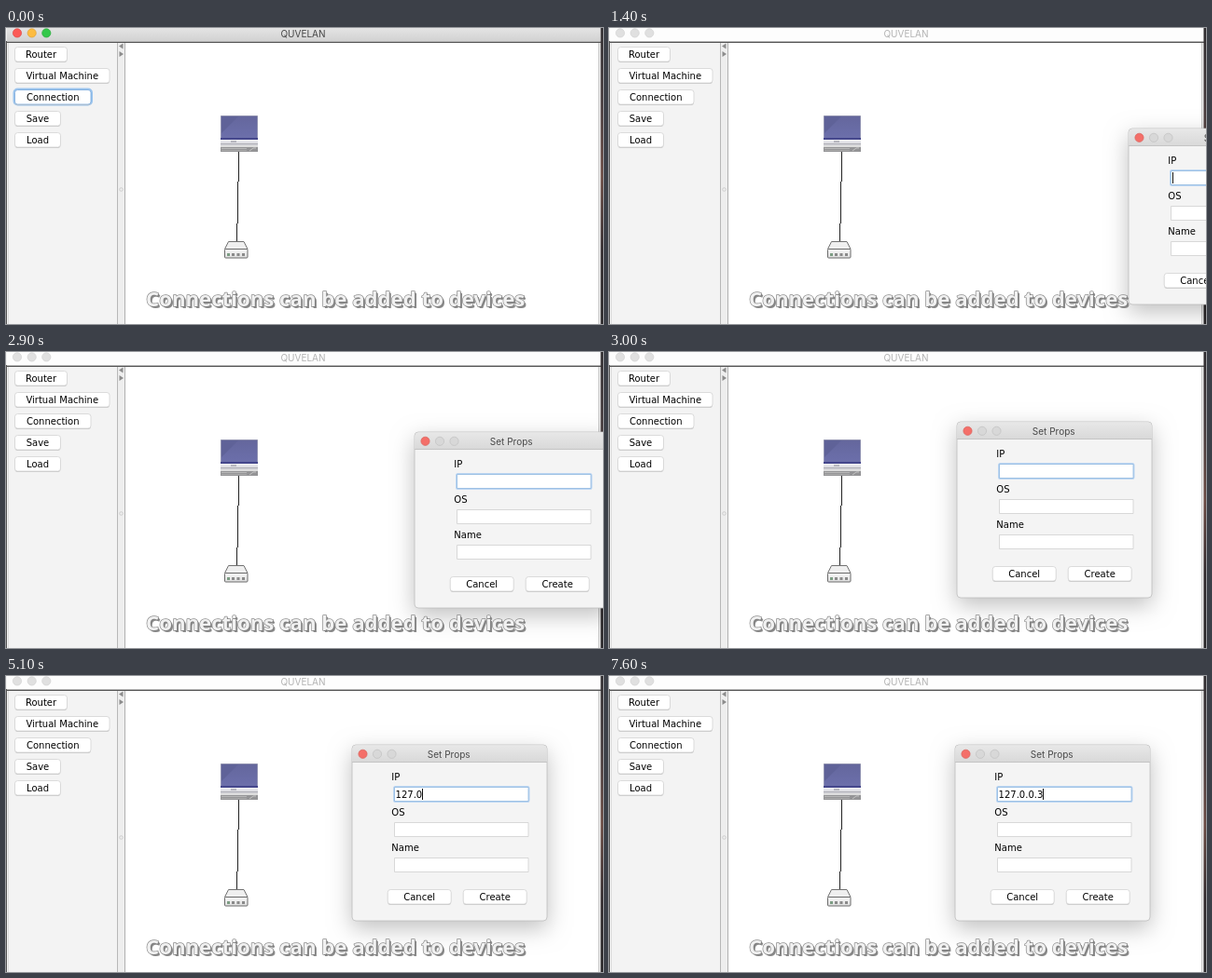
Write an HTML page with a canvas that moves like this. It is 640 px wide and 318 px high and loops after 8 s.

```html
<!DOCTYPE html>
<html lang="en">
<head>
<meta charset="utf-8">
<title>Network editor</title>
<style>
  html, body { margin: 0; width: 100%; height: 100%; overflow: hidden; background: #fff; }
  canvas { display: block; }
</style>
</head>
<body>
<canvas id="stage" width="640" height="318"></canvas>
<script>
const ctx = document.getElementById('stage').getContext('2d');
const LOOP = 8000;
const UI_FONT = '10px "DejaVu Sans", sans-serif';
const TITLE_FONT = '10px Inter, sans-serif';
const CAPTION_FONT = '700 22.2px "Open Sans", sans-serif';
const OPEN_AT = 1200;

// Each track is a list of [start time, value]; a value holds until the next one.
const dialogTrack = [
  [0, [557, 108]], [2800, [536, 100]], [2900, [438, 86]], [3000, [373, 75]], [3100, [371, 74]]
];
const typingTrack = [
  [0, ''], [3700, '1'], [3900, '12'], [4500, '127'], [4700, '127.'], [5100, '127.0'],
  [5300, '127.0.'], [5500, '127.0.0'], [5700, '127.0.03'], [6400, '127.0.0'], [7600, '127.0.0.3']
];
const caretTrack = [
  [0, true], [1900, false], [2400, true], [2900, false], [3500, true], [4400, false],
  [4500, true], [5000, false], [5100, true], [6200, false], [6400, true], [6900, false], [7400, true]
];

function valueAt(track, t) {
  let value = track[0][1];
  for (const [start, v] of track) if (t >= start) value = v;
  return value;
}

function rect(x, y, w, h, fill) {
  ctx.fillStyle = fill;
  ctx.fillRect(x, y, w, h);
}

function rounded(x, y, w, h, r, fill, stroke, lineWidth = 1) {
  ctx.beginPath();
  ctx.roundRect(x, y, w, h, r);
  if (fill) { ctx.fillStyle = fill; ctx.fill(); }
  if (stroke) { ctx.strokeStyle = stroke; ctx.lineWidth = lineWidth; ctx.stroke(); }
}

function path(points, stroke, fill, close) {
  ctx.beginPath();
  points.forEach(([x, y]) => ctx.lineTo(x, y));
  if (close) ctx.closePath();
  if (fill) { ctx.fillStyle = fill; ctx.fill(); }
  if (stroke) { ctx.strokeStyle = stroke; ctx.lineWidth = 1; ctx.stroke(); }
}

function vertical(y0, y1, ...colors) {
  const g = ctx.createLinearGradient(0, y0, 0, y1);
  colors.forEach((c, i) => g.addColorStop(i / (colors.length - 1), c));
  return g;
}

function text(label, x, y, color = '#000', font = UI_FONT, align = 'left') {
  ctx.font = font;
  ctx.textAlign = align;
  ctx.fillStyle = color;
  ctx.fillText(label, x, y);
}

function circle(x, y, r, fill, edge) {
  ctx.beginPath();
  ctx.arc(x, y, r, 0, Math.PI * 2);
  if (fill) { ctx.fillStyle = fill; ctx.fill(); }
  ctx.strokeStyle = edge;
  ctx.lineWidth = 0.7;
  ctx.stroke();
}

function button(label, x, y, w, focused) {
  if (focused) rounded(x, y, w, 16, 3.5, null, '#9cc5ee', 3);
  rounded(x + 0.5, y + 1, w - 1, 16, 3, '#cacaca');
  rounded(x + 0.5, y + 0.5, w - 1, 15.5, 3, '#fff', focused ? '#75a7dc' : '#d4d4d4', 0.8);
  text(label, x + w / 2, y + 11.6, '#000', UI_FONT, 'center');
}

function drawWindow(active) {
  rect(0, 0, 640, 318, '#f3f3f3');
  rect(1, 0, 636, 14, active ? vertical(0, 14, '#e4e4e4', '#d2d2d2') : '#fdfdfd');
  const colors = active
    ? [['#fc5b57', '#df4744'], ['#fdbc40', '#dd9f34'], ['#34c84a', '#27a939']]
    : Array(3).fill(['#e0e0e0', '#d2d2d2']);
  [12, 27.7, 43.3].forEach((x, i) => circle(x, 5.4, 4.6, ...colors[i]));
  text('QUVELAN', 318.5, 9.6, active ? '#454545' : '#b2b2b2', TITLE_FONT, 'center');

  rect(128, 16, 508, 302, '#fff');
  rect(0, 14, 638, 1, '#b5b5b5');
  rect(0, 15, 638, 1, '#555');
  rect(0, 14, 1, 304, '#555');
  rect(2, 16, 1, 302, '#dcdcdc');

  rect(119, 16, 9, 302, '#eeeeee');
  rect(119, 16, 1, 302, '#b8b8b8');
  rect(127, 16, 1, 302, '#b0b0b0');
  path([[125.5, 16.5], [125.5, 22.5], [121, 19.5]], null, '#8c8c8c', true);
  path([[121.5, 25], [121.5, 31], [126, 28]], null, '#8c8c8c', true);
  circle(123.5, 173.5, 1.8, null, '#c2c2c2');

  rect(635, 16, 1, 302, '#c8c8c8');
  rect(636, 16, 2, 302, '#f0f0f0');
  rect(637.5, 0, 2.5, 318, vertical(0, 318, '#302d30', '#443a3c', '#6a4a43', '#30292c', '#282628'));

  button('Router', 9, 20, 57);
  button('Virtual Machine', 9, 43, 102.5);
  button('Connection', 9, 66, 82.5, active);
  button('Save', 9, 89, 50);
  button('Load', 9, 112, 50);
}

function drawCable() {
  rect(249, 133, 1, 32, '#222');
  rect(248, 165, 1, 45, '#222');
  rect(247, 210, 1, 19, '#222');
}

function drawComputer() {
  rect(230, 94, 40, 39, '#b6b7bf');
  rect(230.5, 94.5, 39, 25, vertical(94, 119, '#64669c', '#686ba4', '#6c6fab'));
  path([[231, 95], [249, 95], [231, 113]], null, '#5f6298', true);
  rect(230, 118, 40, 2, '#45478c');
  rect(230, 120, 40, 6, vertical(120, 126, '#f1f1f4', '#cfcfd5'));
  rect(241, 121.5, 6, 1, '#8b8b95');
  rect(230, 124, 40, 1, '#b0b0b8');
  rect(230, 126, 40, 2, '#dcdcdc');
  rect(230, 128, 40, 5, '#949496');
  rect(231, 129, 27, 1, '#b8b8b8');
  rect(231, 131, 27, 1, '#aaa');
  path([[261, 132], [265, 129], [268, 129]], '#c4c4c4');
}

function drawRouter() {
  path([[238.5, 229.5], [255, 229.5], [259, 237.5], [234.5, 237.5]], '#727272', '#efefef', true);
  rounded(234.5, 237.5, 24.5, 9.5, 1, vertical(237, 247, '#fafafa', '#dedede'), '#6a6a6a');
  [238, 243, 248.5, 254].forEach((x, i) => rect(x - 1, 242, 3, 3, i ? '#8a8a8a' : '#7d9d84'));
}

function drawCaption() {
  const caption = 'Connections can be added to devices';
  ctx.font = CAPTION_FONT;
  ctx.textAlign = 'left';
  ctx.lineJoin = 'round';
  ctx.strokeStyle = '#8b8b8b';
  ctx.lineWidth = 1.4;
  ctx.strokeText(caption, 150, 299);
  text(caption, 152, 301, '#8d8d8d', CAPTION_FONT);
  text(caption, 151, 300, '#808080', CAPTION_FONT);
  text(caption, 150, 299, '#f1f1f1', CAPTION_FONT);
}

function drawDialog(t) {
  const [x, y] = valueAt(dialogTrack, t);
  ctx.save();
  ctx.translate(x, y);

  ctx.save();
  ctx.shadowColor = 'rgba(0,0,0,.25)';
  ctx.shadowBlur = 24;
  ctx.shadowOffsetY = 8;
  rounded(0, 0, 209, 189, 4, '#f3f3f3');
  ctx.restore();

  rounded(0, 0, 209, 189, 4, '#f4f4f4', '#bdbdbd', 0.8);
  rounded(0.4, 0.4, 208.2, 18, [4, 4, 0, 0], vertical(0, 18, '#e8e8e8', '#d9d9d9'));
  rect(0, 18, 209, 1, '#c4c4c4');
  circle(11.5, 9.8, 4.6, '#f46f69', '#d9605b');
  circle(27, 9.8, 4.6, '#d8d8d8', '#c0c0c0');
  circle(42.5, 9.8, 4.6, '#d8d8d8', '#c0c0c0');
  text('Set Props', 103.7, 13.5, '#4a4a4a', TITLE_FONT, 'center');

  ['IP', 'OS', 'Name'].forEach((label, i) => {
    const rowY = i * 38.2;
    const fieldY = 45.5 + i * 38;
    text(label, 42.3, 38 + rowY);
    if (i === 0) rounded(45.5, fieldY, 143.5, 15, 1, null, '#bcd6f2', 3);
    rounded(45.5, fieldY, 143.5, 15, 0, '#fff', i ? '#d0d0d0' : '#8fb6e0', 0.8);
  });

  const typed = valueAt(typingTrack, t);
  text(typed, 46.6, 57.2);
  if (valueAt(caretTrack, t)) {
    rect(Math.round(46.6 + ctx.measureText(typed).width), 47, 1, 12, '#111');
  }

  button('Cancel', 37.7, 155, 69);
  button('Create', 118.7, 155, 69);
  ctx.restore();
}

function draw(t) {
  const open = t >= OPEN_AT;
  ctx.clearRect(0, 0, 640, 318);
  drawWindow(!open);
  drawCable();
  drawComputer();
  drawRouter();
  if (open) drawDialog(t);
  drawCaption();
}

const started = performance.now();
function tick() {
  draw((performance.now() - started) % LOOP);
  requestAnimationFrame(tick);
}
tick();
</script>
</body>
</html>
```
